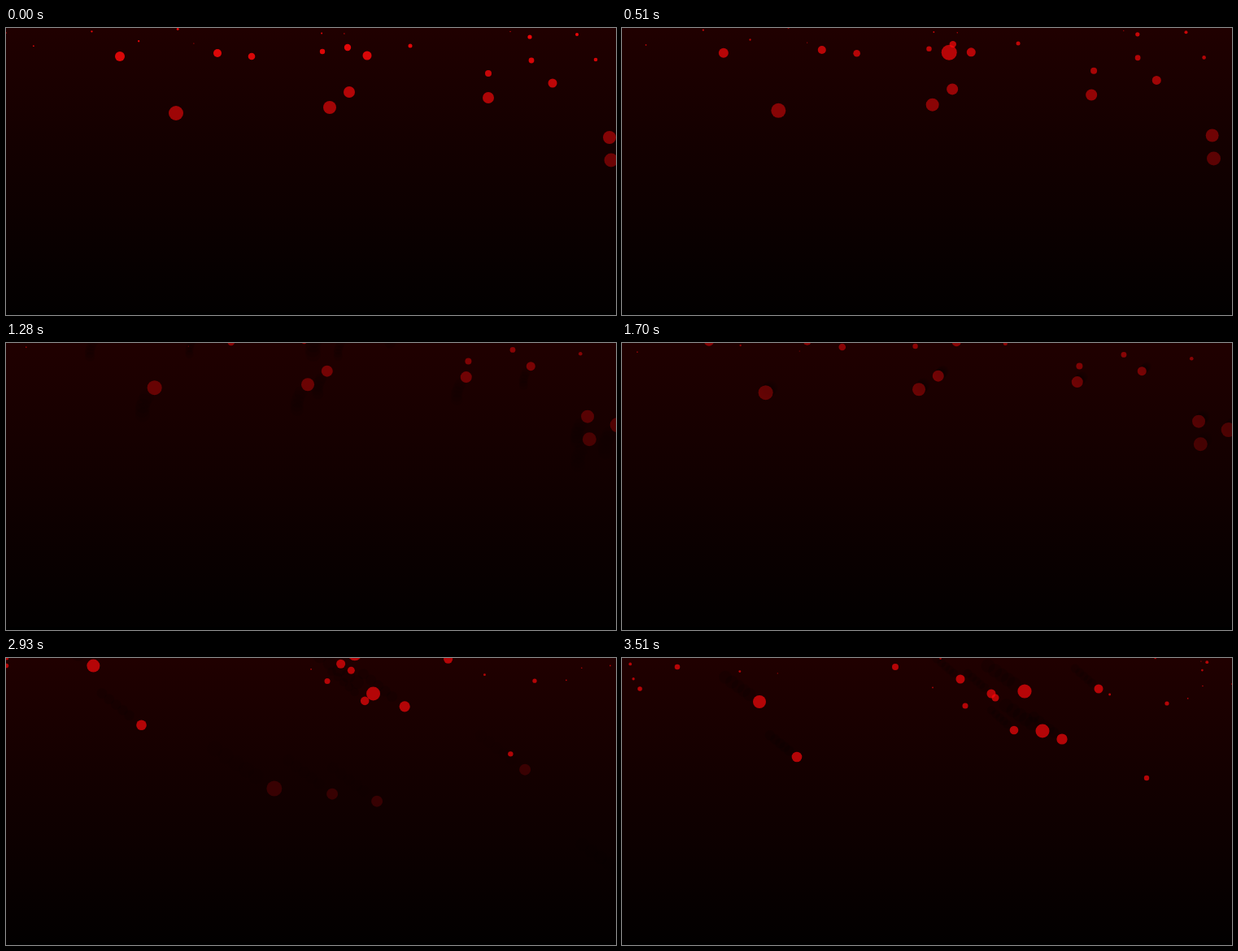
Write an HTML page with a canvas that moves like this. It is 750 px wide and 354 px high and loops after 3610 ms.

```html
<!DOCTYPE html>
<html>
<head>
<meta charset="utf-8">
<style>
  html, body { margin: 0; width: 100%; height: 100%; overflow: hidden; background: #000; }
  canvas { display: block; }
</style>
</head>
<body>
<canvas id="stage" width="750" height="354"></canvas>
<script>
const ctx = document.getElementById('stage').getContext('2d');
const TURN = 780, TOP = 1280, FALL = 2410, END = 3510, LOOP = 3610;
const marks = [0, 40, 510, TURN, TOP, FALL, 2930, END, LOOP];
const clamp = v => Math.max(0, Math.min(1, v));
const mix = (a, b, p) => a + (b - a) * p;

let seed = 11;
const random = () => (seed = seed * 16807 % 2147483647) / 2147483647;
const dust = (count, depth) => Array.from({ length: count }, () =>
  [750 * random(), depth * random() ** 2, .6 + 1.6 * random() ** 2]);

// Dots that rise: starting x, y, radius, and when they show up.
const rising = [
  [209, 105, 9], [398, 98, 8], [422, 79, 7], [593, 86, 7], [742, 135, 8], [744, 163, 8.5],
  [778, 148, 9], [140, 35, 6], [260, 31, 5], [302, 35, 4.3], [444, 34, 5.5], [420, 24, 4.2],
  [672, 68, 5.5], [593, 56, 4], [646, 40, 3.4], [389, 29, 3.2], [644, 11, 2.6], [497, 22, 2.5],
  [725, 39, 2.3], [702, 8, 2], [419, 35, 9.5, 40], [511, 20, 7, 600],
  ...dust(9, 30)
];
// Dots that fall: final x, y, radius.
const falling = [
  [169, 54, 8], [215, 122, 6.3], [403, 210, 9.5], [510, 218, 7], [517, 90, 8.5], [482, 89, 5.3],
  [541, 100, 6.6], [422, 59, 3.5], [454, 44, 5.5], [459, 49, 4.5], [416, 26, 5.5], [586, 38, 5.5],
  [495, 41, 8.6], [645, 148, 3.2], [670, 56, 2.6], [22, 38, 2.8], [68, 11, 3.3], [336, 11, 4],
  [455, 209, 7], [692, 179, 7], [832, 319, 8],
  ...dust(14, 50)
];

// Drift left and slightly up, sweep up to the right, then settle; bigger dots move further.
function rise([x, y, r, since = 0], t) {
  const near = 1 - Math.exp(-r / 3);
  const p = clamp(t / TURN), q = clamp((t - TURN) / (TOP - TURN)), settle = 6 * clamp((t - TOP) / 330);
  return {
    r,
    x: x - 41 * near * p ** 2 + 1.4 * r * q * (2.4 * q - 1.4) - settle,
    y: y - (18 - .07 * y) * near * p ** 2.7 - (10 + 3.3 * r) * q + settle,
    alpha: t < since ? 0 : (.95 - .0035 * y) * mix(1, .82, clamp(t / 300)) * (1 - .3 * q)
  };
}

// Slide down to the right, slowing a little; the lowest dots fade away.
function fall([x, y, r], t) {
  const q = (t - FALL) / (END - FALL), left = 1 - q - .35 * q * (1 - q);
  return {
    r,
    x: x - 17.5 * r * left,
    y: y - (45 + 7 * r) * left,
    alpha: y > 170 ? .42 * clamp(1 - q) ** 1.5 : mix(.48, .68, clamp(2 * q))
  };
}

function disc({ x, y, r }, color) {
  ctx.beginPath();
  ctx.arc(x, y, r, 0, 2 * Math.PI);
  ctx.fillStyle = color;
  ctx.fill();
}

// Motion advances in steps of about 70 ms between the marks.
function stepTime(t) {
  const i = marks.findIndex(mark => mark > t) - 1, gap = marks[i + 1] - marks[i];
  const step = gap / Math.max(1, Math.round(gap / 70));
  return marks[i] + step * Math.floor((t - marks[i]) / step);
}

function draw(now) {
  const t = stepTime(now % LOOP), late = t >= FALL;
  const dots = late ? falling : rising, pose = late ? fall : rise;

  const sky = ctx.createLinearGradient(0, 0, 0, 350);
  sky.addColorStop(0, '#200000');
  sky.addColorStop(1, '#020000');
  ctx.fillStyle = '#000';
  ctx.fillRect(0, 350, 750, 4);
  ctx.fillStyle = sky;
  ctx.fillRect(0, 0, 750, 350);

  // Dim wake along the recent path.
  const wakeStart = Math.max(t - 480, late ? FALL : TURN);
  for (const dot of dots.filter(([, , r]) => r > 4.5))
    for (let past = t - 140; past > wakeStart; past -= 70)
      disc(pose(dot, past), `rgba(0,0,0,${.2 * pose(dot, t).alpha})`);

  for (const dot of dots) {
    const p = pose(dot, t);
    disc(p, `rgba(255,8,10,${p.alpha})`);
  }
}

const start = performance.now();
(function frame() {
  draw(performance.now() - start);
  requestAnimationFrame(frame);
})();
</script>
</body>
</html>
```
